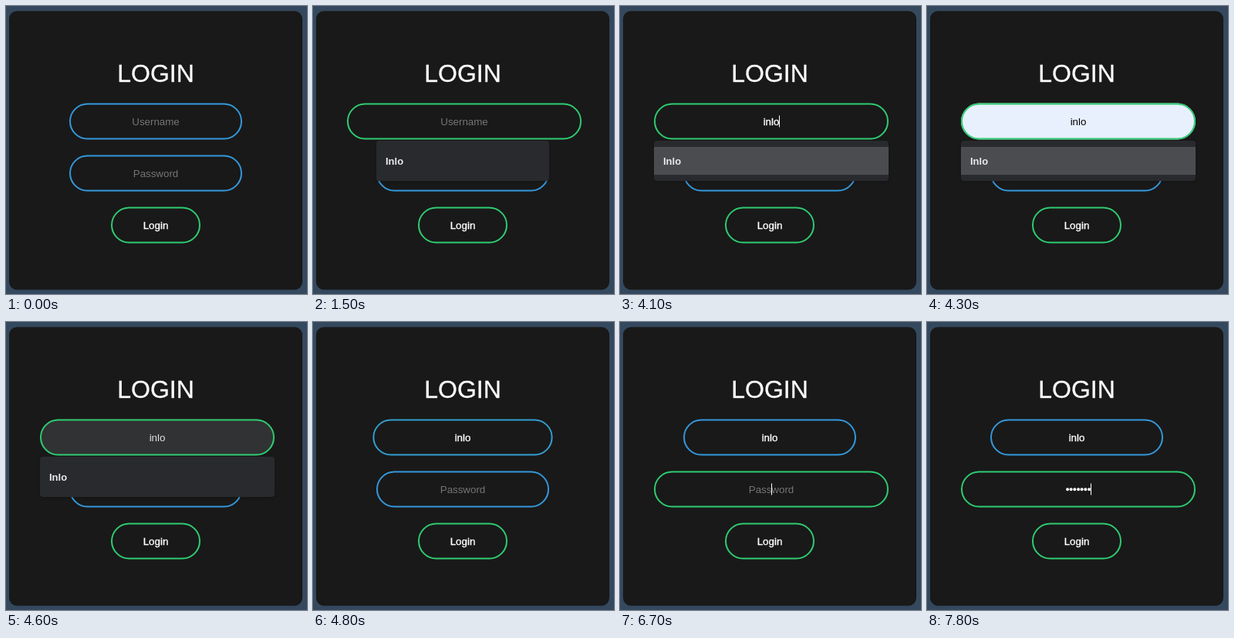
An HTML page with a canvas for the animation above (8 s loop, 390x372 px).

```html
<!DOCTYPE html>
<html lang="en">
<head>
<meta charset="utf-8">
<title>Login form</title>
<style>
  html, body { margin: 0; width: 100%; height: 100%; overflow: hidden; background: #34495e; }
  canvas { display: block; }
</style>
</head>
<body>
<canvas id="stage" width="390" height="372"></canvas>
<script>
const ctx = document.getElementById('stage').getContext('2d');
const LOOP = 8000, STEP = 100;
const FAMILY = '"Liberation Sans", Arial, sans-serif';
const FONT = '13.333px ' + FAMILY;
const BLUE = [52, 152, 219], GREEN = [46, 204, 113];
const WHITE = [255, 255, 255], BLACK = [0, 0, 0];
const USER = 'inlo', SUGGESTION = 'Inlo';

const mix = (a, b, p) => a.map((v, i) => v + (b[i] - v) * p);
const rgb = (c, alpha = 1) => `rgba(${c.map(Math.round).join(',')},${alpha})`;
const within = (t, from, to) => t >= from && t < to;

// CSS "ease": cubic-bezier(.25, .1, .25, 1)
function ease(x) {
  if (x <= 0) return 0;
  if (x >= 1) return 1;
  const curve = (s, a, b) => 3 * s * (1 - s) ** 2 * a + 3 * s * s * (1 - s) * b + s ** 3;
  let lo = 0, hi = 1;
  for (let i = 0; i < 24; i++) {
    const mid = (lo + hi) / 2;
    if (curve(mid, .25, .25) < x) lo = mid; else hi = mid;
  }
  return curve(lo, .1, 1);
}
const glide = (t, start, length = 250) => ease((t - start) / length);

// How many of the key times have passed
const typed = (t, times) => times.filter(k => t >= k).length;

function roundRect(x, y, w, h, r) {
  ctx.beginPath();
  ctx.roundRect(x, y, w, h, r);
}

function label(text, x, y, color, { font = FONT, align = 'center', heavy = 0 } = {}) {
  ctx.font = font;
  ctx.textAlign = align;
  ctx.fillStyle = ctx.strokeStyle = color;
  ctx.fillText(text, x, y);
  if (heavy) {
    ctx.lineWidth = heavy;
    ctx.lineJoin = 'round';
    ctx.strokeText(text, x, y);
  }
}

function pill(x, y, w, border, fill) {
  if (fill) {
    roundRect(x, y, w, 47, 23.5);
    ctx.fillStyle = fill;
    ctx.fill();
  }
  roundRect(x + 1, y + 1, w - 2, 45, 22.5);
  ctx.strokeStyle = border;
  ctx.lineWidth = 2;
  ctx.stroke();
}

// An input that widens and turns green with focus (0 to 1)
function field(y, focus, { text, hint, caret, preview = 0 }) {
  const w = 224 + 80 * focus;
  const x = Math.max(44, 194 - w / 2);
  const cx = x + w / 2;
  pill(x, y, w, rgb(mix(BLUE, GREEN, focus)), preview && rgb([232, 240, 254], preview));
  if (text) {
    label(text, cx, y + 28.5, rgb(mix(WHITE, BLACK, preview)), { heavy: preview ? 0 : .35 });
  } else {
    label(hint, cx, y + 28.5, '#757575');
  }
  if (caret) {
    ctx.font = FONT;
    const end = cx + (text ? ctx.measureText(text).width / 2 : 0);
    ctx.fillStyle = '#fff';
    ctx.fillRect(Math.floor(end), y + 16, 1, 15);
  }
}

function dropdown(x, w, hover) {
  ctx.save();
  ctx.shadowColor = 'rgba(0,0,0,.3)';
  ctx.shadowBlur = 3;
  ctx.shadowOffsetY = 1;
  roundRect(x, 174, w, 52, 4);
  ctx.fillStyle = '#292a2d';
  ctx.fill();
  ctx.restore();
  if (hover) {
    ctx.fillStyle = '#4b4c4f';
    ctx.fillRect(x, 182, w, 36);
  }
  label(SUGGESTION, x + 12, 205, '#e8eaed', { font: 'bold 13px ' + FAMILY, align: 'left' });
}

function draw(t) {
  ctx.fillStyle = '#34495e';
  ctx.fillRect(0, 0, 390, 372);
  roundRect(4, 6.5, 380, 360, 10);
  ctx.fillStyle = '#191919';
  ctx.fill();
  label('LOGIN', 194, 98, '#fff', { font: '32px ' + FAMILY, heavy: .3 });

  const userFocus = glide(t, 933) - glide(t, 4650);
  const userCaret = within(t, 1000, 1500) || within(t, 1900, 3100) || within(t, 3600, 4200);
  field(125.5, userFocus, {
    text: USER.slice(0, typed(t, [2400, 2600, 3700, 3800])),
    hint: 'Username',
    caret: userCaret,
    preview: glide(t, 4110, 190) - glide(t, 4450)
  });

  const passCaret = within(t, 5700, 6200) || t >= 6700;
  field(192.5, glide(t, 5633), {
    text: '\u2022'.repeat(typed(t, [7100, 7100, 7300, 7400, 7500, 7600, 7800])),
    hint: 'Password',
    caret: passCaret
  });

  pill(136, 259.5, 116, rgb(GREEN));
  label('Login', 194, 288, '#fff', { heavy: .35 });

  if (within(t, 1100, 2500)) dropdown(82, 224, false);
  if (within(t, 2500, 4700)) dropdown(44, 304, within(t, 4100, 4500));
}

const start = performance.now();
function tick() {
  const t = (performance.now() - start) % LOOP;
  draw(Math.floor(t / STEP) * STEP);
  requestAnimationFrame(tick);
}
tick();
</script>
</body>
</html>
```
